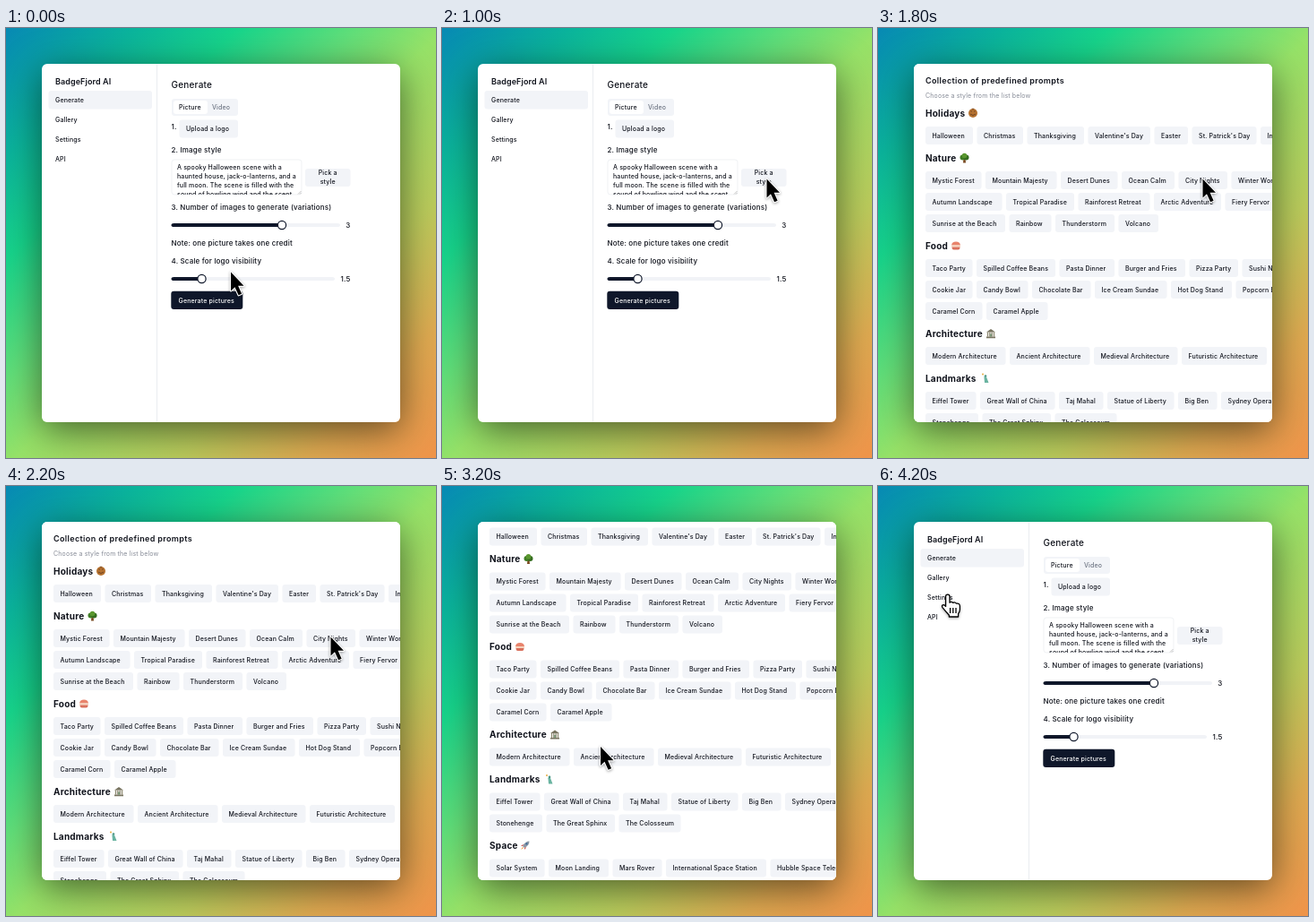
An HTML page that plays this animation: 480x480 px, repeating every 4300 ms.

```html
<!DOCTYPE html>
<html lang="en">
<head>
<meta charset="utf-8">
<title>Picture generator demo</title>
<style>
  html, body { margin: 0; width: 100%; height: 100%; overflow: hidden; }
  #stage {
    position: relative; width: 480px; height: 480px; overflow: hidden;
    background: linear-gradient(135deg, #0789b4 0%, #0bb49c 15%, #17d48b 27%,
      #62df79 41%, #96e268 51%, #bbcc5c 70%, #dfaa51 85%, #f0944a 100%);
  }
  #win, #shade {
    position: absolute; left: 40.4px; top: 40.4px; width: 399.2px; height: 399.2px;
    border-radius: 6px;
  }
  #win { overflow: hidden; background: #fff; }
  #shade { box-shadow: 0 9px 42px rgba(0, 0, 0, .56); }
  svg { position: absolute; left: 0; top: 0; }
  #win svg { left: -40.4px; top: -40.4px; }
  text { font-family: Inter, sans-serif; font-weight: 500; letter-spacing: .022em; fill: #10131c; }
  #cursors { filter: drop-shadow(0 1.5px 1.5px rgba(0, 0, 0, .35)); }
</style>
</head>
<body>
<div id="stage">
  <div id="shade"></div>
  <div id="win">
    <svg width="480" height="480">
      <defs><clipPath id="area"><rect x="185" y="147" width="145" height="39"/></clipPath></defs>
      <g id="page"></g>
      <g id="sheet"></g>
    </svg>
  </div>
  <svg width="480" height="480">
    <defs>
      <path id="arrow" d="M0 0V21L4.5 16.8 8.6 25.8 12.1 24.2 8.1 15.3H14.5Z"
        fill="#000" stroke="#fff" stroke-width="2.2" paint-order="stroke" stroke-linejoin="round"/>
      <g id="hand" stroke="#000" stroke-width="1.3" stroke-linejoin="round">
        <path fill="#fff" d="M-2.4 1.6Q-2.4-.8-.2-.8T2 1.6V8.2Q3.8 6.6 5.8 8.4 7.8 7.2 9.4 9.2
          13 8.4 13.4 12V16Q13.2 18.5 11.6 20.6V24H1.4V22.2Q-2.8 17.6-6 13.6-7.4 11-5 10.6-3.6 10.6-2.4 12.4Z"/>
        <path d="M2.6 14v6M5.8 14v6M9 14v6"/>
      </g>
    </defs>
    <g id="cursors"></g>
  </svg>
</div>
<script>
const $ = id => document.getElementById(id);
const INK = '#0f172a', SOFT = '#f2f4f8', LINE = '#eaecf0', GREY = '#6b7280';

const text = (x, y, str, size = 7, attrs = '') =>
  `<text x="${x}" y="${y}" font-size="${size}" ${attrs}>${str.replace(/&/g, '&amp;')}</text>`;
const box = (x, y, w, h, fill = SOFT, attrs = '') =>
  `<rect x="${x}" y="${y}" width="${w}" height="${h}" rx="3" fill="${fill}" ${attrs}/>`;
const bold = 'style="font-weight:700"';
const semi = 'style="font-weight:600;letter-spacing:.04em"';
const mid = 'text-anchor="middle"';

const slider = (y, knob, end, value) =>
  box(184.5, y - 2, end - 184.5, 4, '#f1f3f7') + box(184.5, y - 2, knob - 184.5, 4, INK) +
  `<circle cx="${knob}" cy="${y}" r="4.6" fill="#fff" stroke="${INK}" stroke-width="1.2"/>` +
  text(384.5, y + 2.9, value, 8, 'text-anchor="end"');

const prompt = ['A spooky Halloween scene with a', 'haunted house, jack-o-lanterns, and a',
  'full moon. The scene is filled with the', 'sound of howling wind and the scent'];

$('page').innerHTML =
  text(55, 62.5, 'BadgeFjord AI', 9, 'style="font-weight:600;letter-spacing:.01em"') +
  box(47.5, 70, 115.5, 20.5) +
  ['Generate', 'Gallery', 'Settings', 'API'].map((s, i) => text(55, 82.8 + 22 * i, s)).join('') +
  `<path d="M168.5 40V440" stroke="${LINE}"/>` +
  text(184.5, 67, 'Generate', 10) +
  box(185, 79, 74, 19) + box(187, 81, 38, 15, '#fff') +
  text(193, 91, 'Picture') + text(230, 91, 'Video', 7, `style="fill:${GREY}"`) +
  text(184.5, 113, '1.', 8) + box(193.5, 102.5, 65.5, 20) + text(201, 115, 'Upload a logo') +
  text(184.5, 139, '2. Image style', 8) +
  box(185, 147, 145, 39, '#fff', `stroke="${LINE}" stroke-width=".7"`) +
  `<g clip-path="url(#area)">${prompt.map((s, i) => text(191, 158.4 + 9.9 * i, s)).join('')}</g>` +
  '<path d="M326 185.5l3.5-3.5M328 185.5l1.5-1.5" stroke="#888" stroke-width=".5"/>' +
  box(334, 157, 50.5, 20) + text(359.2, 164.4, 'Pick a', 7, mid) + text(359.2, 174.3, 'style', 7, mid) +
  text(184.5, 203, '3. Number of images to generate (variations)', 8) +
  slider(220, 308, 373, '3') +
  text(184.5, 243, 'Note: one picture takes one credit', 8) +
  text(184.5, 263, '4. Scale for logo visibility', 8) +
  slider(280, 218.5, 367, '1.5') +
  box(184.3, 293.8, 80, 20.2, INK) + text(192.5, 306.5, 'Generate pictures', 7, 'style="fill:#fff"');

// Small pictograms, each in an 11 by 11 cell
const icons = {
  treat: '<circle cx="5.5" cy="5.5" r="5" fill="#b5712f"/><path d="M3 3.5h1.5M6.5 3.5H8M2.5 6.5q3 3 6 0M5.5 0v2" stroke="#6d4220" fill="none"/>',
  tree: '<path d="M4.5 6h2l.5 5H4z" fill="#7a4a22"/><circle cx="3.5" cy="5" r="3" fill="#3f7d24"/><circle cx="7.5" cy="5" r="3" fill="#356d20"/><circle cx="5.5" cy="3" r="2.8" fill="#5a972f"/>',
  food: '<path d="M.5 5Q1 1 5.5 1t5 4z" fill="#e8836b"/><path d="M.5 5h10v2H.5z" fill="#f6d3bd"/><path d="M1 7h9q0 3-2 3H3Q1 10 1 7z" fill="#d9705c"/>',
  temple: '<path d="M.5 4L5.5.5l5 3.5zM.5 9h10v1.7H.5z" fill="#77735f"/><path d="M2 4v5M4.3 4v5M6.7 4v5M9 4v5" stroke="#8f8a72" stroke-width="1.3"/><path d="M5.5 6v3" stroke="#2f6b3a"/>',
  statue: '<path d="M2 .5l1.3 3.5L6 4l2.5 6.5H4L3.5 5z" fill="#69b3a0"/><circle cx="5" cy="3" r="1.3" fill="#4c9686"/><circle cx="2" cy="1" r="1" fill="#e5ad43"/>',
  rocket: '<path d="M10.5.5Q6 .5 3 6l2 2Q10.5 5 10.5.5z" fill="#8c98a6"/><path d="M4 4L1 5.5 3 6zM7 7L5.5 10 5 8z" fill="#c83f38"/><path d="M3 7l1 1-3 2z" fill="#f0a034"/><circle cx="7.5" cy="3.5" r="1.1" fill="#37699a"/>',
  film: '<path d="M.5 4h9v6h-9zM.5 3L9.5.5l.5 1.7L1 4.5z" fill="#33363c"/><path d="M3 2.5l1 1M6 1.6l1 1" stroke="#fff"/>'
};

// Title, middle line, icon, icon place, then rows of labels with chip edges
const sections = [
  ['Holidays', 95, 'treat', 100.5,
    ["Halloween|Christmas|Thanksgiving|Valentine's Day|Easter|St. Patrick's Day|Independence Day", 53, 110.5, 166.5, 234.5, 308.5, 350.5, 427, 500]],
  ['Nature', 145, 'tree', 91,
    ['Mystic Forest|Mountain Majesty|Desert Dunes|Ocean Calm|City Nights|Winter Wonderland', 53, 120, 204, 272, 335.5, 394.5, 500],
    ['Autumn Landscape|Tropical Paradise|Rainforest Retreat|Arctic Adventure|Fiery Fervor', 53, 143, 223.5, 308, 387.5, 450],
    ['Sunrise at the Beach|Rainbow|Thunderstorm|Volcano', 53, 146.5, 198, 268.5, 317.5]],
  ['Food', 243, 'food', 81.5,
    ['Taco Party|Spilled Coffee Beans|Pasta Dinner|Burger and Fries|Pizza Party|Sushi Night', 53, 110, 202.5, 268.5, 347.5, 406.5, 470],
    ['Cookie Jar|Candy Bowl|Chocolate Bar|Ice Cream Sundae|Hot Dog Stand|Popcorn Bucket', 53, 110, 172, 242, 327, 399.5, 480],
    ['Caramel Corn|Caramel Apple', 53, 121, 194]],
  ['Architecture', 341, 'temple', 120.5,
    ['Modern Architecture|Ancient Architecture|Medieval Architecture|Futuristic Architecture', 53, 147, 241, 339, 438.5]],
  ['Landmarks', 391, 'statue', 115,
    ['Eiffel Tower|Great Wall of China|Taj Mahal|Statue of Liberty|Big Ben|Sydney Opera House', 53, 114, 202, 256, 335, 383, 480],
    ['Stonehenge|The Great Sphinx|The Colosseum', 53, 116.5, 197.5, 271]],
  ['Space', 465, 'rocket', 87,
    ['Solar System|Moon Landing|Mars Rover|International Space Station|Hubble Space Telescope', 53, 119, 190.5, 250, 366.5, 480],
    ['Aurora Borealis|Satellite', 53, 127, 175.5]],
  ['Movies & TV', 538.5, 'film', 118]
];

const chips = ([labels, ...edges], y) => labels.split('|').map((s, i) =>
  box(edges[i], y - 10, edges[i + 1] - edges[i] - 4.5, 20) + text(edges[i] + 7.5, y + 2.5, s)).join('');

$('sheet').innerHTML = box(36, 36, 408, 720, '#fff') +
  text(53, 62.3, 'Collection of predefined prompts', 9, semi) +
  text(53, 78, 'Choose a style from the list below', 7, 'style="font-weight:400;fill:#858a96"') +
  sections.map(([title, y, icon, x, ...rows]) =>
    text(53, y + 3.7, title, 10, bold) +
    `<g transform="translate(${x} ${y - 5.5})">${icons[icon]}</g>` +
    rows.map((row, i) => chips(row, y + 25 + 24 * i)).join('')).join('');

const LOOP = 4300, STEP = 100;
const OPEN = 1700, CLOSE = 3900, HAND = 4000;

const ease = p => p < .5 ? 4 * p ** 3 : 1 - 4 * (1 - p) ** 3;
const ramp = (t, from, span) => ease(Math.min(1, Math.max(0, (t - from) / span)));

// Start, duration, target, sideways bend
const moves = [
  [300, 700, 362.5, 168.5, 4.6, 4.6],
  [2200, 500, 177, 291, 0, 0],
  [3350, 730, 78, 122, -4, 4]
];

function pointer(t) {
  let x = 251, y = 272.5;
  for (const [from, span, tx, ty, bx, by] of moves) {
    const e = ramp(t, from, span), bow = Math.sin(Math.PI * e);
    x += (tx - x) * e + bx * bow;
    y += (ty - y) * e + by * bow;
  }
  return [x, y];
}

const scroll = t => 98 * (ramp(t, 2300, 450) - ramp(t, 3000, 450));

function cursor(t) {
  const place = (dt, alpha) => {
    const [x, y] = pointer(t + dt);
    return `<use href="#${t < HAND ? 'arrow' : 'hand'}" x="${x}" y="${y}" opacity="${alpha}"/>`;
  };
  const [ax, ay] = pointer(t - 20), [bx, by] = pointer(t + 20);
  const blur = Math.hypot(bx - ax, by - ay) > 3;
  return (blur ? [-8, -4, 4, 8].map(dt => place(dt, .22)).join('') : '') + place(0, blur ? .65 : 1);
}

function draw(t) {
  const open = t >= OPEN && t < CLOSE;
  $('sheet').style.display = open ? '' : 'none';
  $('sheet').setAttribute('transform', `translate(0 ${-scroll(t)})`);
  $('cursors').innerHTML = cursor(t);
}

const start = performance.now();
let last = -1;
function tick() {
  const t = Math.floor((performance.now() - start) % LOOP / STEP) * STEP;
  if (t !== last) draw(last = t);
  requestAnimationFrame(tick);
}
tick();
</script>
</body>
</html>
```
